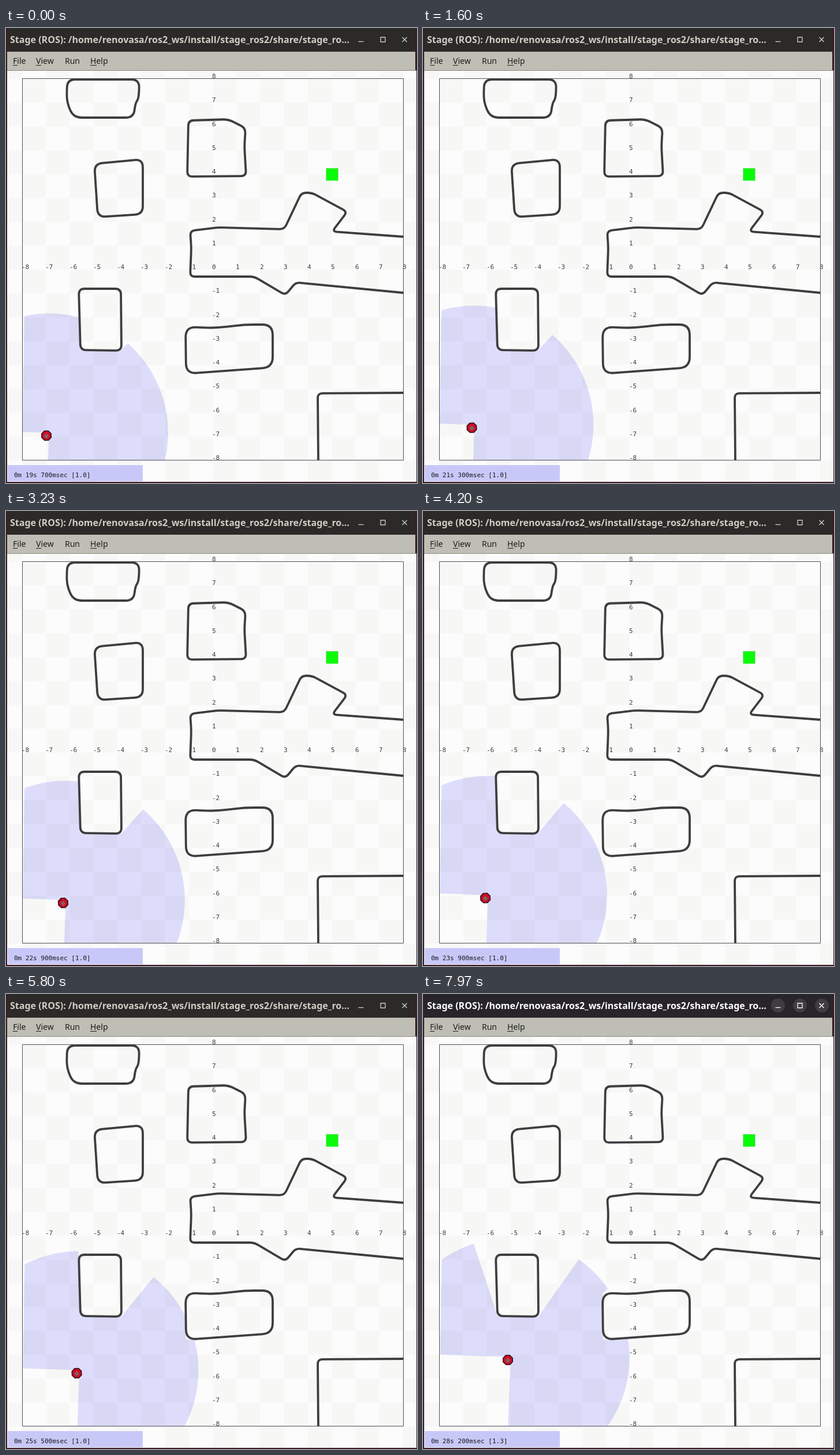
An HTML page with a canvas for the animation above (8 s loop, 712 by 787 pixels).

```html
<!DOCTYPE html>
<html lang="en">
<head>
<meta charset="utf-8">
<title>Robot simulator</title>
<style>
  html, body { margin: 0; width: 100%; height: 100%; overflow: hidden; background: #fcfcfd; }
  canvas { display: block; }
</style>
</head>
<body>
<canvas id="view" width="712" height="787"></canvas>
<script>
const ctx = document.getElementById('view').getContext('2d');
const W = 712, H = 787, LOOP = 8000;
const CELL = 41.25, LEFT = 28, TOP = 88, RIGHT = 688, BOTTOM = 748;
const CX = (LEFT + RIGHT) / 2, CY = (TOP + BOTTOM) / 2;
const MONO = '11px "DejaVu Sans Mono", monospace';
const SANS = '"Noto Sans", sans-serif';

// A shape is a few corner points; "round" is how far each corner is cut back when drawn
const shape = (round, corners, closed = true) =>
  ({ round, closed, pts: corners.split(' ').map(p => p.split(',').map(Number)) });

const obstacles = [
  shape(14, '106,89 105,128 117,155 221,155 224,130 230,122 231,89'),
  shape(9, '314,257 316,160 385,158 415,173 413,205 416,256'),
  shape(14, '153,235 237,227 237,322 159,327'),
  shape(10, '126,451 199,451 200,558 129,557'),
  shape(18, '311,517 365,519 412,513 462,513 462,587 312,598'),
  shape(8, '688,361 565,352 591,318 530,285 512,285 482,348 366,345 319,351 321,380 319,430 430,430 484,462 502,440 688,458', false),
  shape(8, '541,748 540,632 688,631', false)
];
const walls = shape(0, `${LEFT + 10},${TOP} ${RIGHT},${TOP} ${RIGHT},${BOTTOM} ${LEFT},${BOTTOM}`);

const segments = [...obstacles, walls].flatMap(({ pts, closed }) =>
  pts.map((p, i) => [p, pts[(i + 1) % pts.length]]).slice(0, closed ? undefined : -1));

// Simulated clock: real time at first, then a faster rate
const simTime = t => Math.floor((19710 + t + 0.34 * Math.max(0, t - 6400)) / 100) * 100;

function rect(x, y, w, h, color) {
  ctx.fillStyle = color;
  ctx.fillRect(x, y, w, h);
}

function label(text, x, y, font, color) {
  ctx.font = font;
  ctx.fillStyle = color;
  ctx.fillText(text, x, y);
}

function line(color, width, ...pts) {
  ctx.strokeStyle = color;
  ctx.lineWidth = width;
  ctx.beginPath();
  pts.forEach(([x, y]) => ctx.lineTo(x, y));
  ctx.stroke();
}

function polygon(x, y, r, sides, turn, fill) {
  ctx.beginPath();
  for (let i = 0; i < sides; i++) {
    const a = turn + i * 2 * Math.PI / sides;
    ctx.lineTo(x + r * Math.cos(a), y + r * Math.sin(a));
  }
  ctx.fillStyle = fill;
  ctx.fill();
}

function drawFloor() {
  rect(0, 73, W, H - 73, '#fcfcfd');
  for (let row = -1; row < 17; row++) {
    for (let col = -1; col < 17; col++) {
      if ((row + col) % 2 === 0) {
        rect(LEFT + col * CELL, TOP + row * CELL, CELL, CELL, '#f7f7f5');
      }
    }
  }
}

// Distance along a ray to the nearest segment, capped at max
function castRay(x, y, dx, dy, max) {
  let best = max;
  for (const [[ax, ay], [bx, by]] of segments) {
    const ex = bx - ax, ey = by - ay;
    const det = dx * ey - dy * ex;
    if (!det) continue;
    const d = ((ax - x) * ey - (ay - y) * ex) / det;
    const u = ((ax - x) * dy - (ay - y) * dx) / det;
    if (d > 0 && d < best && u >= 0 && u <= 1) best = d;
  }
  return best;
}

function drawScan(x, y) {
  const heading = 43, range = 5 * CELL;
  ctx.beginPath();
  ctx.moveTo(x, y);
  for (let a = heading - 135; a <= heading + 135; a += 0.5) {
    const r = a * Math.PI / 180, dx = Math.cos(r), dy = -Math.sin(r);
    const d = castRay(x, y, dx, dy, range);
    ctx.lineTo(x + dx * d, y + dy * d);
  }
  ctx.fillStyle = 'rgba(0, 0, 240, 0.125)';
  ctx.fill();
}

function drawAxes() {
  for (let i = -8; i <= 8; i++) {
    label(i, Math.round(CX - 1 + i * CELL), CY - 1, MONO, '#3c3c44');
    if (i) label(i, CX - 1, Math.round(CY - 1 - i * CELL), MONO, '#3c3c44');
  }
}

// The point at most "cut" away from a on the way to b
function toward([ax, ay], [bx, by], cut) {
  const f = Math.min(0.5, cut / Math.hypot(bx - ax, by - ay));
  return [ax + (bx - ax) * f, ay + (by - ay) * f];
}

function drawObstacle({ pts, round, closed }) {
  const n = pts.length;
  ctx.beginPath();
  pts.forEach((p, i) => {
    if (!closed && (i === 0 || i === n - 1)) {
      ctx.lineTo(...p);
    } else {
      ctx.lineTo(...toward(p, pts[(i + n - 1) % n], round));
      ctx.quadraticCurveTo(...p, ...toward(p, pts[(i + 1) % n], round));
    }
  });
  if (closed) ctx.closePath();
  ctx.strokeStyle = '#3e3e40';
  ctx.lineWidth = 3.8;
  ctx.lineJoin = 'round';
  ctx.stroke();
}

function drawRobot(x, y) {
  polygon(x, y, 9.7, 8, 0.35, '#40101f');
  polygon(x, y, 7.8, 8, 0.35, '#cf0c26');
  polygon(x, y + 0.8, 4.6, 4, 0.05, '#875c62');
}

function drawTitleBar(focused) {
  rect(0, 0, W, 41, focused ? '#28252a' : '#2c2a28');
  const ink = focused ? '#ffffff' : '#cfcdc4';
  label('Stage (ROS): /home/renovasa/ros2_ws/install/stage_ros2/share/stage_ro...',
    7, 26, 'bold 16px ' + SANS, ink);
  if (focused) {
    for (const x of [615, 653, 691]) polygon(x, 20, 12, 40, 0, '#3f3d3f');
  }
  line(ink, 1.3, [610.5, 23.5], [619.5, 23.5]);
  ctx.strokeRect(649, 16, 8, 8);
  line(ink, 1.5, [686.5, 16], [694.5, 24]);
  line(ink, 1.5, [694.5, 16], [686.5, 24]);
}

function drawMenu() {
  rect(0, 41, W, 32, '#bfbeb5');
  rect(0, 73, W, 1, '#8a8981');
  const item = (text, x, underline) => {
    label(text, x, 62, '14px ' + SANS, '#1c1c1c');
    rect(x, 64, underline, 1, '#1c1c1c');
  };
  item('File', 12, 8);
  item('View', 52, 9);
  item('Run', 102, 0);
  item('Help', 146, 11);
}

function drawStatus(sim, ratio) {
  rect(3, 756, 234, 28, '#c8c8f8');
  const seconds = Math.floor(sim / 1000), rest = String(sim % 1000).padStart(3, '0');
  label(`0m ${seconds}s ${rest}msec [${ratio}]`, 14, 777, MONO, '#18181e');
}

function drawWindowEdge() {
  const color = '#3c1a24';
  rect(0, 0, 2, H, color);
  rect(W - 1, 0, 1, H, color);
  rect(W - 3, 0, 3, 73, color);
  rect(0, H - 2, W, 2, color);
}

function drawFrame(t) {
  const sim = simTime(t);
  const travel = (sim - 19700) / 1000;
  const x = 70 + 9.06 * travel, y = 705 - 8.47 * travel;

  drawFloor();
  drawScan(x + 4.5, y - 5);
  drawAxes();
  ctx.strokeStyle = '#505056';
  ctx.lineWidth = 1;
  ctx.strokeRect(LEFT + 0.5, TOP - 0.5, RIGHT - LEFT, BOTTOM - TOP);
  obstacles.forEach(drawObstacle);
  rect(554, 242, 22, 22, '#b0d4b0');
  rect(555, 243, 20, 21, '#08fb08');
  drawRobot(x, y);
  drawStatus(sim, t < 7200 ? '1.0' : '1.3');
  drawTitleBar(t >= 6300);
  drawMenu();
  drawWindowEdge();
}

const start = performance.now();
function tick() {
  drawFrame((performance.now() - start) % LOOP);
  requestAnimationFrame(tick);
}
tick();
</script>
</body>
</html>
```
